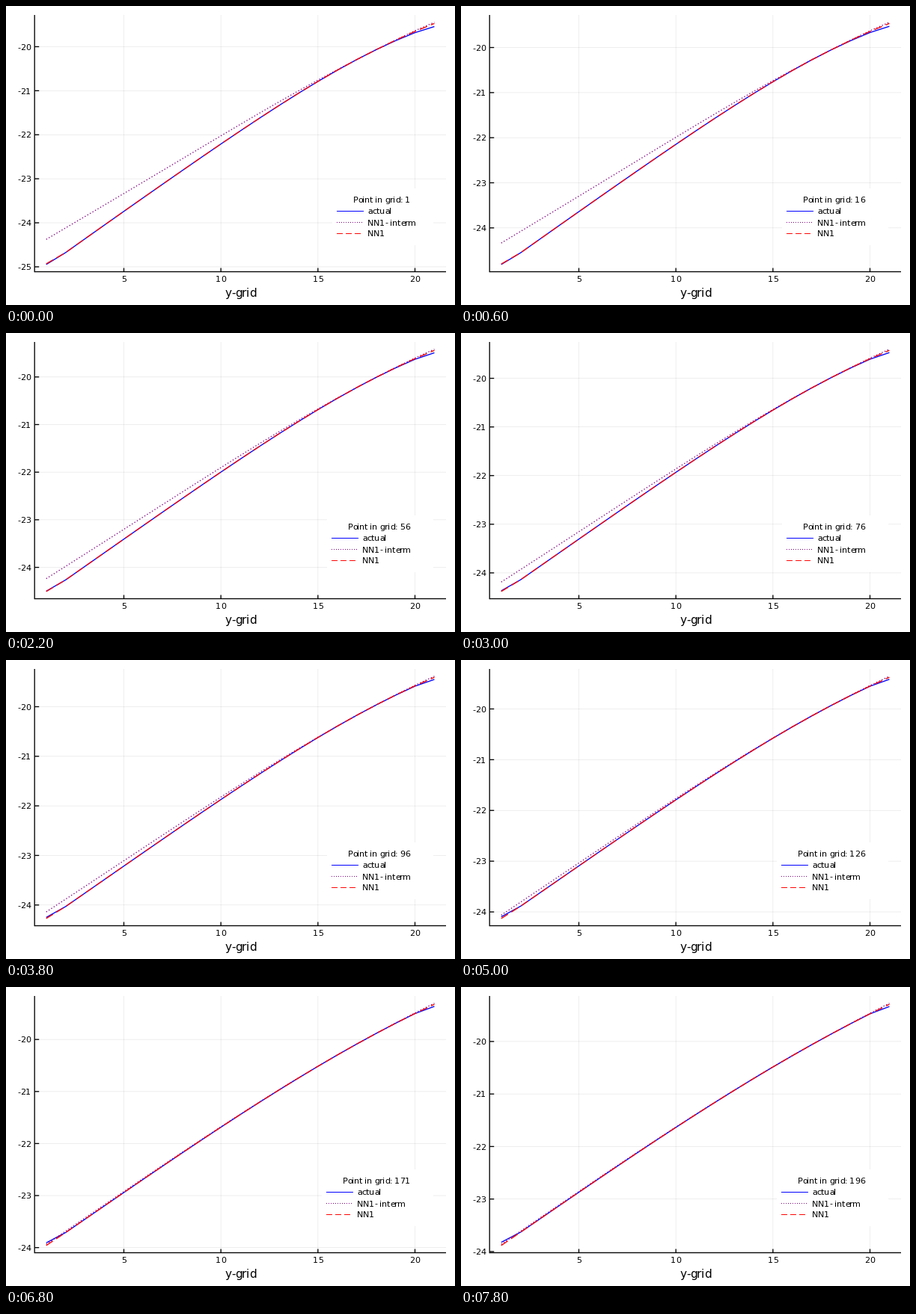
A matplotlib script for the animation above (8000 ms loop, 600 px wide and 400 px high).

```python
import math
from functools import lru_cache

import numpy as np
import matplotlib.pyplot as plt
from matplotlib.animation import FuncAnimation
from matplotlib.patches import Rectangle
from matplotlib.textpath import TextPath

plt.rcParams["font.family"] = "DejaVu Sans"

PT = 0.72  # points per pixel at 100 dpi
THIN, THICK = 1.0, 1.33
LEFT, RIGHT, TOP, BOTTOM = 38.2, 588, 12, 355.5
FRAMES, INTERVAL, STEP = 40, 200, 5
LAST = 1 + STEP * (FRAMES - 1)

X = np.arange(1, 22)
U = (X - 11) / 10
FIRST_X, LAST_X = X == 1, X == 21
RISE = np.clip((X - 18) / 3, 0, 1) ** 1.5   # lift at the right end
FALL = np.clip((17 - X) / 15, 0, None) ** 1.45  # gap fading from the left


def decay(point, tau):
    """Exponential relaxation scaled to run from 1 to 0 over the loop."""
    end = math.exp(-(LAST - 1) / tau)
    return (math.exp(-(point - 1) / tau) - end) / (1 - end)


def curves(point):
    s = (point - 1) / (LAST - 1)
    slow, fast, q = decay(point, 250), decay(point, 177), (1 - s) ** 2.15
    base = (-21.397 - 0.5155 * slow
            + (2.366 + 0.5856 * fast) * U
            - (0.191 + 0.0645 * fast) * U**2
            - (0.07 + 0.148 * (1 - s)) * U**3
            - 0.09 * fast * U**4)
    actual = (base + (0.045 + 0.015 * s) * FIRST_X
              - (0.018 + 0.025 * s) * LAST_X)
    interm = base + (0.02 + 0.54 * q) * FALL + (0.02 + 0.06 * q) * RISE
    nn = base + 0.06 * (1 - s) * FIRST_X + 0.052 * q * RISE
    return actual, interm, nn


def x_px(x):
    return LEFT + (RIGHT - LEFT) * (x - 0.4) / 21.2


fig = plt.figure(figsize=(6, 4), dpi=100, facecolor="white")
ax = fig.add_axes([0, 0, 1, 1])
ax.set_xlim(0, 600)
ax.set_ylim(400, 0)
ax.axis("off")


def line(xs, ys, color="black", width=THICK, z=2, dash=None, alpha=1):
    art, = ax.plot(xs, ys, color=color, lw=width * PT, zorder=z, alpha=alpha,
                   solid_capstyle="butt", dash_capstyle="butt", snap=False)
    if dash:
        art.set_dashes(dash)
    return art


def grid_line(xs, ys):
    return line(xs, ys, width=THICK / 2, z=1, alpha=0.1)


@lru_cache(maxsize=None)
def advance(ch, size):
    """Glyph advance cut down to whole pixels."""
    def end(s):
        return TextPath((0, 0), s, size=size / PT).get_extents().x1
    return math.floor(end(ch + "|") - end("|"))


class Label:
    """Text set glyph by glyph on the pixel grid."""

    def __init__(self, s, x=0, y=0, size=8, slots=None):
        self.size = size
        self.glyphs = [ax.text(0, 0, "", fontsize=size, va="baseline", zorder=7)
                       for _ in range(slots or len(s))]
        self.place(s, x, y)

    def place(self, s, x, y):
        for art, ch in zip(self.glyphs, s.ljust(len(self.glyphs))):
            art.set_text(ch.strip())
            art.set_position((x, y))
            x += advance(ch, self.size)

    def set_visible(self, on):
        for art in self.glyphs:
            art.set_visible(on)


def centered(s, x, y, size=8):
    width = sum(advance(ch, size) for ch in s)
    return Label(s, x - width / 2, y, size)


for x in range(5, 21, 5):
    px = x_px(x)
    grid_line([px, px], [TOP, BOTTOM])
    line([px, px], [BOTTOM, BOTTOM - 5])
    centered(str(x), px, 369.3)
line([LEFT, LEFT], [TOP, BOTTOM + THICK / 2])
line([LEFT, RIGHT], [BOTTOM, BOTTOM])
centered("y-grid", (LEFT + RIGHT) / 2, 389, 11)

ticks = {v: (grid_line([LEFT, RIGHT], [0, 0]),
             line([LEFT, LEFT + 6], [0, 0]),
             Label(str(v)))
         for v in range(-25, -18)}

STYLES = [("actual", "blue", None),
          ("NN1- interm", "purple", (1, 2)),
          ("NN1", "red", (8, 4))]
series = [line([], [], color, z=3 + i, dash=dash)
          for i, (_, color, dash) in enumerate(STYLES)]

box = ax.add_patch(Rectangle((0, 244), 1, 75.5, fc="white", ec="none", zorder=6))
title = Label("", slots=len("Point in grid: 000"))
entries = []
for i, (name, color, dash) in enumerate(STYLES):
    y = 274.5 + 15 * i
    entries.append((line([0, 0], [y, y], color, THIN, 7, dash),
                    Label(name), name, y + 4))


def update(i):
    point = 1 + STEP * i
    data = curves(point)
    lo, hi = np.min(data), np.max(data)
    pad = 0.03 * (hi - lo)
    lo, hi = lo - pad, hi + pad

    def y_px(v):
        return TOP + (BOTTOM - TOP) * (hi - v) / (hi - lo)

    for art, ys in zip(series, data):
        art.set_data(x_px(X), y_px(ys))

    for v, (grid, tick, text) in ticks.items():
        y = y_px(v)
        for art in (grid, tick, text):
            art.set_visible(bool(lo <= v <= hi))
        grid.set_ydata([y, y])
        tick.set_ydata([y, y])
        text.place(str(v), 15, y + 4.2)

    # the legend widens to the left with each extra digit
    left = 483 - advance("0", 8) * (len(str(point)) - 1)
    box.set_x(left - 47)
    box.set_width(571 - (left - 47))
    title.place(f"Point in grid: {point}", left - 19, 263.3)
    for sample, text, name, y in entries:
        sample.set_xdata([left - 41, left - 5])
        text.place(name, left, y)
    return []


anim = FuncAnimation(fig, update, frames=FRAMES, interval=INTERVAL,
                     init_func=lambda: update(0), repeat=True, repeat_delay=0)
plt.show()
```
